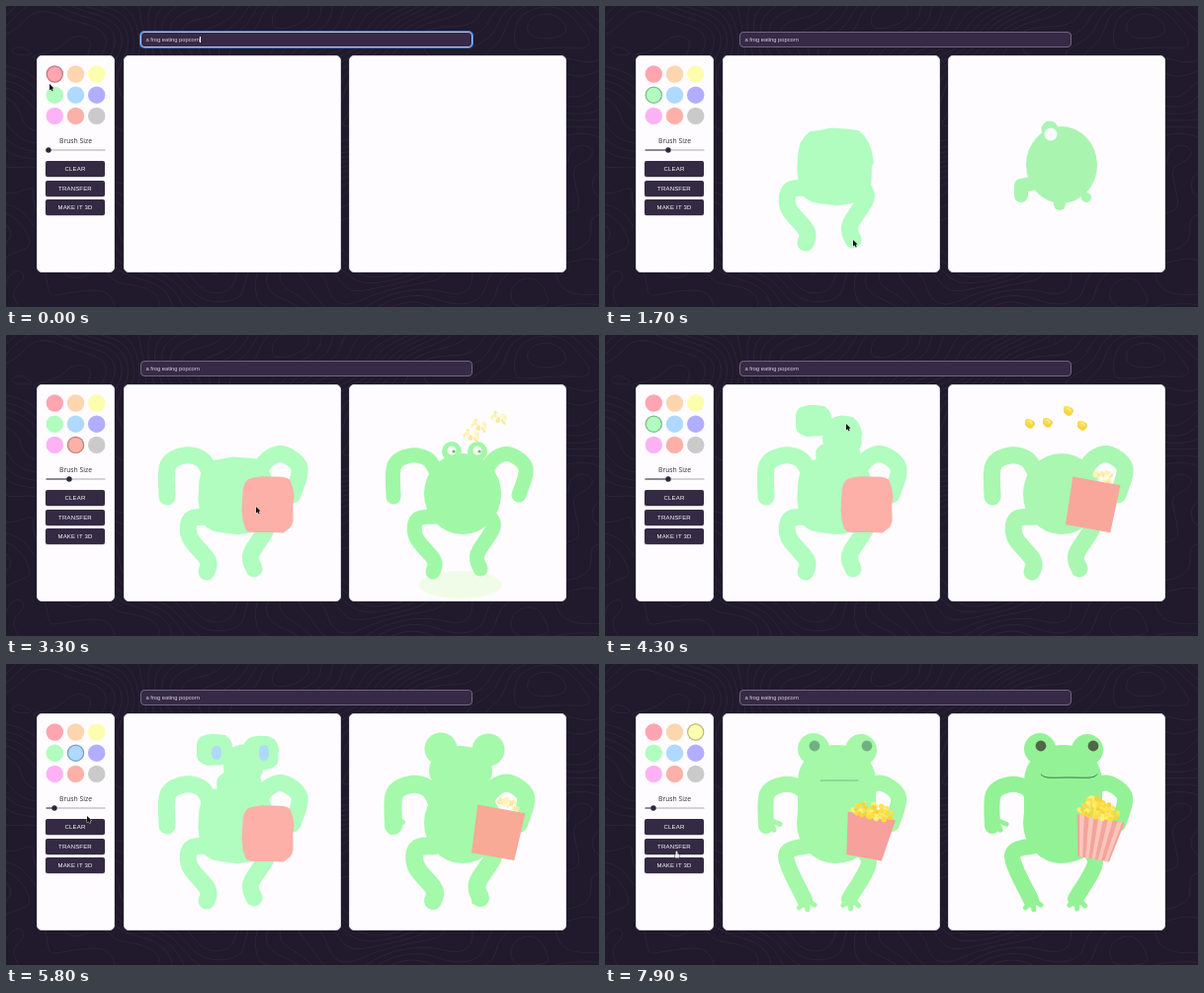
Animation, 600 px wide and 305 px high, one loop 8000 ms. Source, as an HTML page with a canvas:

```html
<!DOCTYPE html>
<html lang="en">
<head>
<meta charset="utf-8">
<title>Sketch to picture</title>
<style>
html, body { margin: 0; width: 100%; height: 100%; overflow: hidden; background: #211a2d; }
body > * { position: absolute; box-sizing: border-box; }
canvas { left: 0; top: 0; }
.panel { top: 50px; height: 220px; width: 220px; background: #fefcff; border: 1px solid #d3dcda; border-radius: 5px; }
#prompt { left: 136px; top: 26px; width: 336px; height: 16px; padding-left: 4.5px; background: #362a47;
  border: 1px solid #70667f; border-radius: 4px; color: #d9d4df; font: 5.75px/15px "Liberation Sans", Arial, sans-serif; }
#prompt.focus { border-color: #a9c4f0; box-shadow: 0 0 0 1px #3f78d0; }
#prompt.focus::after { content: ""; border-left: .7px solid #fff; margin-left: .3px; }
#size { left: 31px; width: 79px; top: 131px; text-align: center; color: #322b3c; font: 6.8px/11px "Open Sans", sans-serif; }
.button { left: 40px; width: 60px; height: 16px; border-radius: 2px; background: #342a43; color: #fff; text-align: center;
  font: 6px/16.5px "Liberation Sans", Arial, sans-serif; letter-spacing: .18px; box-shadow: 0 .5px 1px #0005; }
</style>
</head>
<body>
<canvas id="back" width="600" height="305"></canvas>
<div id="prompt">a frog eating popcorn</div>
<div class="panel" style="left:31px;width:79px"></div>
<div class="panel" style="left:119px"></div>
<div class="panel" style="left:347px"></div>
<div id="size">Brush Size</div>
<div class="button" style="top:157px">CLEAR</div>
<div class="button" style="top:177px">TRANSFER</div>
<div class="button" style="top:196px">MAKE IT 3D</div>
<canvas id="stage" width="600" height="305"></canvas>
<script>
const LOOP = 8000, STEP = 100, RESULT_X = 229, TRANSFER = 7000;
const GREEN = '#b0fdbf', CORAL = '#fdb0a8', BLUE = '#afd9ff', YELLOW = '#fdfdae';
const SWATCHES = ['#ffa5b0', '#fdd5ae', YELLOW, GREEN, BLUE, '#b1aeff', '#fdb1f5', CORAL, '#cacaca'];
const c = document.getElementById('stage').getContext('2d');
const promptBox = document.getElementById('prompt');

const mix = (a, b, p) => a.map((v, k) => v + (b[k] - v) * p);
const latest = (list, t) => list.filter(e => e[0] <= t).pop();
const polar = (x, y, r, a) => [x + r * Math.cos(a), y + r * Math.sin(a)];
const random = seed => () => (seed = seed * 16807 % 2147483647) / 2147483647;

// Catmull-Rom samples through "x,y x,y ..."
function curve(text) {
  const pts = text.split(' ').map(p => p.split(',').map(Number)), out = [];
  for (let i = 0; i < pts.length - 1; i++) {
    const [a, b, d, e] = [pts[i - 1] || pts[i], pts[i], pts[i + 1], pts[i + 2] || pts[i + 1]];
    for (let s = 0; s < 1; s += .125) {
      out.push([0, 1].map(k => b[k] + .5 * s * (d[k] - a[k] +
        s * (2 * a[k] - 5 * b[k] + 4 * d[k] - e[k] + s * (3 * (b[k] - d[k]) + e[k] - a[k])))));
    }
  }
  return [...out, pts[pts.length - 1]];
}

function trace(pts) {
  c.beginPath();
  pts.forEach(p => c.lineTo(...p));
}

function line(pts, color, width) {
  trace(pts);
  c.strokeStyle = color;
  c.lineWidth = width;
  c.stroke();
}

function shape(pts, color) {
  trace(pts);
  c.fillStyle = color;
  c.fill();
}

function oval(x, y, rx, ry, color) {
  c.beginPath();
  c.ellipse(x, y, rx, ry, 0, 0, 7);
  c.fillStyle = color;
  c.fill();
}
const dot = (x, y, r, color) => oval(x, y, r, r, color);

function drawContours() {
  const g = document.getElementById('back').getContext('2d'), n = 3;
  const height = (x, y) => Math.sin(x * .013 + 1.6 * Math.sin(y * .014)) + Math.sin(y * .019 + 1.5 * Math.sin(x * .012 + 2)) +
    .12 * Math.sin(x * .06 + y * .05) + .1 * Math.sin(x * .04 - y * .09);
  g.strokeStyle = '#322a3e';
  g.lineWidth = .7;
  g.beginPath();
  for (let x = 0; x < 600; x += n) for (let y = 0; y < 305; y += n) {
    const corners = [[x, y], [x + n, y], [x + n, y + n], [x, y + n]];
    const h = corners.map(p => height(...p));
    for (let level = -2.2; level < 2.3; level += .2) {
      const cuts = [];
      corners.forEach((p, i) => {
        const j = (i + 1) % 4;
        if (h[i] < level !== h[j] < level) cuts.push(mix(p, corners[j], (level - h[i]) / (h[j] - h[i])));
      });
      for (let i = 0; i + 1 < cuts.length; i += 2) {
        g.moveTo(...cuts[i]);
        g.lineTo(...cuts[i + 1]);
      }
    }
  }
  g.stroke();
}

// Limbs shared by the sketch and the results
const LIMBS = {
  legL: curve('205,184 187,187 186,205 204,228 203,240'),
  legR: curve('259,182 264,195 248,222 251,237'),
  armL: curve('207,140 198,126 181,122 164,132 163,164'),
  armR: curve('254,140 266,125 281,121 297,135 290,162')
};
const POSED = { ...LIMBS, legL: curve('206,184 183,194 202,239'), legR: curve('252,182 267,201 247,238') };

// Brush work: strokes follow a limb, fills scribble inside a hand-drawn blob
const stroke = (from, to, path) => ({ from, to, width: 17, color: GREEN, path });

function fill(from, to, color, x, y, rx, ry, square = 2.5) {
  const rnd = random(from), outline = [], path = [];
  const bend = v => Math.sign(v) * Math.abs(v) ** (2 / square);
  for (let a = 0; a < 6.28; a += .26) {
    const r = .97 + .06 * rnd();
    outline.push([x + rx * r * bend(Math.cos(a)), y + ry * r * bend(Math.sin(a))]);
  }
  for (let dy = -ry, side = -.85; dy < ry + 6; dy += 9, side = -side) {
    for (let s = -1; s <= 1; s += .25) path.push([x + rx * side * s, y + dy]);
  }
  return { from, to, width: 16, color, outline, path };
}

const WORK = [
  fill(800, 1200, GREEN, 233, 163, 38, 39, 3),
  stroke(1200, 1450, LIMBS.legL),
  stroke(1500, 1700, LIMBS.legR),
  stroke(1850, 2200, LIMBS.armL),
  stroke(2250, 2600, LIMBS.armR),
  fill(2900, 3200, CORAL, 265, 172, 26, 28, 5),
  fill(3700, 3950, GREEN, 211, 87, 18, 16, 3),
  fill(3950, 4050, GREEN, 236, 121, 23, 13),
  fill(4050, 4250, GREEN, 240, 103, 20, 21),
  fill(4350, 4600, GREEN, 258, 90, 18, 17, 3),
  fill(5150, 5300, BLUE, 213, 90, 5, 7),
  fill(5350, 5500, BLUE, 261, 90, 5, 8),
  fill(6100, 6350, YELLOW, 268, 149, 24, 7, 3)
];

const swatchAt = i => [49.3 + i % 3 * 21.2, 69 + Math.floor(i / 3) * 21.2];
const PICKS = [[0, 0], [300, 3], [2800, 7], [3500, 3], [4700, 4], [5950, 2]];
const KNOB = [[0, 43], [500, 43], [700, 64], [4850, 64], [5000, 49], [LOOP, 49]];
const POINTER = [
  [0, 44, 79], [3300, 253, 174], [4300, 244, 90], [5800, 82, 154], [6600, 87, 186], [TRANSFER, 87, 186], [LOOP, 71, 191],
  ...PICKS.slice(1).map(([t, i]) => [t, ...swatchAt(i)]),
  ...KNOB.slice(1, 5).map(([t, x]) => [t, x, 146]),
  ...WORK.flatMap(({ from, to, path }) => [[from, ...path[0]], [to, ...path[path.length - 1]]])
].sort((a, b) => a[0] - b[0]);

function along(keys, t) {
  const i = keys.findIndex(k => k[0] > t), a = keys[i - 1], b = keys[i];
  return mix(a, b, (t - a[0]) / (b[0] - a[0])).slice(1);
}

// Draws the sketch and returns the brush tip while one is moving
function drawSketch(t) {
  let tip;
  for (const { from, to, width, color, outline, path } of WORK) {
    if (t <= from) continue;
    const part = path.slice(0, Math.ceil(path.length * (t - from) / (to - from)));
    if (t < to) tip = part[part.length - 1];
    if (outline && t >= to) {
      shape(outline, color);
      continue;
    }
    c.save();
    if (outline) {
      trace(outline);
      c.clip();
    }
    line(part, color, width);
    c.restore();
  }
  return tip;
}

const PALE = ['#fffbe6', '#fff3b4', '#f7e9a4'], GOLD = ['#f8d23c', '#ffe64f', '#fff07c', '#fbdc45'];

function popcorn(x, y, rx, ry, tones = GOLD) {
  const rnd = random(rx * 97 + 5);
  for (let i = 0; i < rx * 3; i++) {
    const [u, v] = polar(0, 0, Math.sqrt(rnd()), rnd() * 6.3);
    dot(x + u * rx, y + v * ry + u * 3, 1.3 + rnd() * 1.6, tones[i % tones.length]);
  }
}

// Tilted tub: half widths at top and bottom, optional stripes
function tub(x, y, tall, bottom, color, stripe, count = 0) {
  const half = 24.5, h = tall / 2;
  const strip = (p, q) => [[p * half, -h], [q * half, -h], [q * bottom, h], [p * bottom, h]];
  c.save();
  c.translate(x, y);
  c.rotate(.18);
  shape(strip(-1, 1), color);
  for (let i = 0; i < count; i++) shape(strip((2 * i + .5) / count - 1, (2 * i + 1.5) / count - 1), stripe);
  c.restore();
}

function fan(x, y, angle, length, color) {
  for (const turn of [-.8, 0, .8]) line([[x, y], polar(x, y, length, angle + turn)], color, 5);
}

function digits(color, length) {
  fan(167, 158, 1.2, length, color);
  fan(203, 238, 1.4, length, color);
  fan(249, 237, 1.6, length, color);
}

function figure(color, width, limbs = Object.values(LIMBS)) {
  limbs.forEach(path => line(path, color, width));
  oval(233, 161, 39, 41, color);
}

function head(color, r) {
  dot(211, 86, r, color);
  dot(259, 87, r, color);
}

function bulb() {
  const g = '#a9f5b0';
  oval(233, 161, 36, 39, g);
  line([[203, 180], [192, 182], [192, 192]], g, 14);
  dot(221, 125, 8.5, g);
  dot(231, 201, 6, g);
  dot(258, 194, 5, g);
  dot(222, 130, 6.5, '#fefcff');
}

const early = limbs => () => {
  const g = '#a0f8a6';
  oval(231, 253, 42, 14, '#f1fce8');
  figure(g, 15, Object.values(LIMBS).slice(0, limbs));
  for (const x of [222, 248]) {
    dot(x, 118, 10, g);
    dot(x, 117, 4.5, '#f4fbef');
    dot(x + 2, 118, 1.6, '#85a985');
  }
  for (const [x, y] of [[242, 102], [250, 92], [270, 84]]) popcorn(x, y, 7, 6, PALE);
};

const headless = holding => () => {
  figure('#a9f7b0', 17, undefined);
  if (!holding) return;
  popcorn(276, 143, 10, 6, PALE);
  tub(264, 172, 49, 23, '#f9a79b');
  for (const [x, y] of [[201, 90], [219, 89], [240, 77], [254, 92]]) {
    oval(x, y, 5, 4, '#ecd067');
    popcorn(x, y, 3, 2);
  }
};

function eared() {
  const g = '#a4f9aa';
  figure(g, 18);
  oval(231, 108, 32, 25, g);
  head(g, 16.5);
  digits(g, 6);
  popcorn(279, 142, 11, 5, PALE);
  tub(268, 171, 49, 22, '#f8aa96');
}

function softFrog() {
  const g = '#a2f8aa';
  figure(g, 17);
  oval(234, 104, 36, 23, g);
  head(g, 16.5);
  digits(g, 12);
  for (const x of [211, 259]) {
    dot(x, 86, 5, '#c6d0c5');
    dot(x + 1, 85, 2.5, '#7e8a82');
  }
  line(curve('223,97 233,98 245,96'), '#82ce91', .8);
  popcorn(270, 150, 22, 7);
  tub(265, 175, 43, 19, '#f6a58d', '#fac3ab', 11);
}

const frog = fine => () => {
  const g = fine ? '#93f296' : '#a4f8a7';
  figure(g, 16, Object.values(POSED));
  c.beginPath();
  c.roundRect(195, 82, 79, 119, 37);
  c.fill();
  head(g, 16);
  digits(g, 11);
  for (const x of [212, 265]) dot(x, 83, 5.4, fine ? '#50654a' : '#70b181');
  line(curve(fine ? '212,112 219,115 240,115 262,115 269,112' : '218,118 256,118'), fine ? '#40724d' : '#78ba87', 1);
  if (fine) tub(269, 177, 42, 16, '#f3a49c', '#fbc6ba', 5);
  else tub(266, 175, 43, 18, '#f7a09c');
  popcorn(271, 149, 22, 8);
  if (fine) popcorn(270, 142, 12, 6);
};

const RESULTS = [
  [0, () => {}], [1100, bulb], [2000, early(2)], [2400, early(3)], [2800, early(4)], [3500, headless(false)],
  [3900, headless(true)], [4800, eared], [6400, softFrog], [6900, frog(false)], [7300, frog(true)]
];

function drawSidebar(t) {
  const pick = latest(PICKS, t)[1], [knob] = along(KNOB, t);
  SWATCHES.forEach((color, i) => {
    dot(...swatchAt(i), 8.7, color);
    if (i !== pick) return;
    c.beginPath();
    c.arc(...swatchAt(i), 8.1, 0, 7);
    c.strokeStyle = '#0004';
    c.lineWidth = 1.2;
    c.stroke();
  });
  line([[41, 146], [100, 146]], '#aaa5b0', 1.1);
  line([[41, 146], [knob, 146]], '#4a4057', 1.1);
  dot(knob, 146, 2.7, '#30263e');
}

function drawPointer([x, y], hand) {
  c.save();
  c.translate(x, y);
  c.fillStyle = hand ? '#eee' : '#111';
  c.strokeStyle = hand ? '#18131e' : '#fff';
  c.lineWidth = .7;
  c.beginPath();
  if (hand) {
    c.roundRect(-1, -1, 1.8, 5, .8);
    c.roundRect(-2, 2, 5, 4, 1.5);
  } else [[0, 0], [0, 6.5], [1.5, 5.3], [2.7, 7.6], [3.7, 7], [2.7, 4.8], [4.6, 4.6], [0, 0]].forEach(p => c.lineTo(...p));
  c.stroke();
  c.fill();
  c.restore();
}

function drawResult(draw, x) {
  c.save();
  c.translate(x, 0);
  draw();
  c.restore();
}

function frame(now) {
  const t = Math.floor(now % LOOP / STEP) * STEP;
  c.clearRect(0, 0, 600, 305);
  c.lineCap = c.lineJoin = 'round';
  promptBox.className = t < 200 ? 'focus' : '';
  drawSidebar(t);
  const tip = t < TRANSFER ? drawSketch(t) : drawResult(frog(false), 0);
  drawResult(latest(RESULTS, t)[1], RESULT_X);
  drawPointer(tip || along(POINTER, t), t >= 6600);
  requestAnimationFrame(frame);
}

drawContours();
requestAnimationFrame(frame);
</script>
</body>
</html>
```
